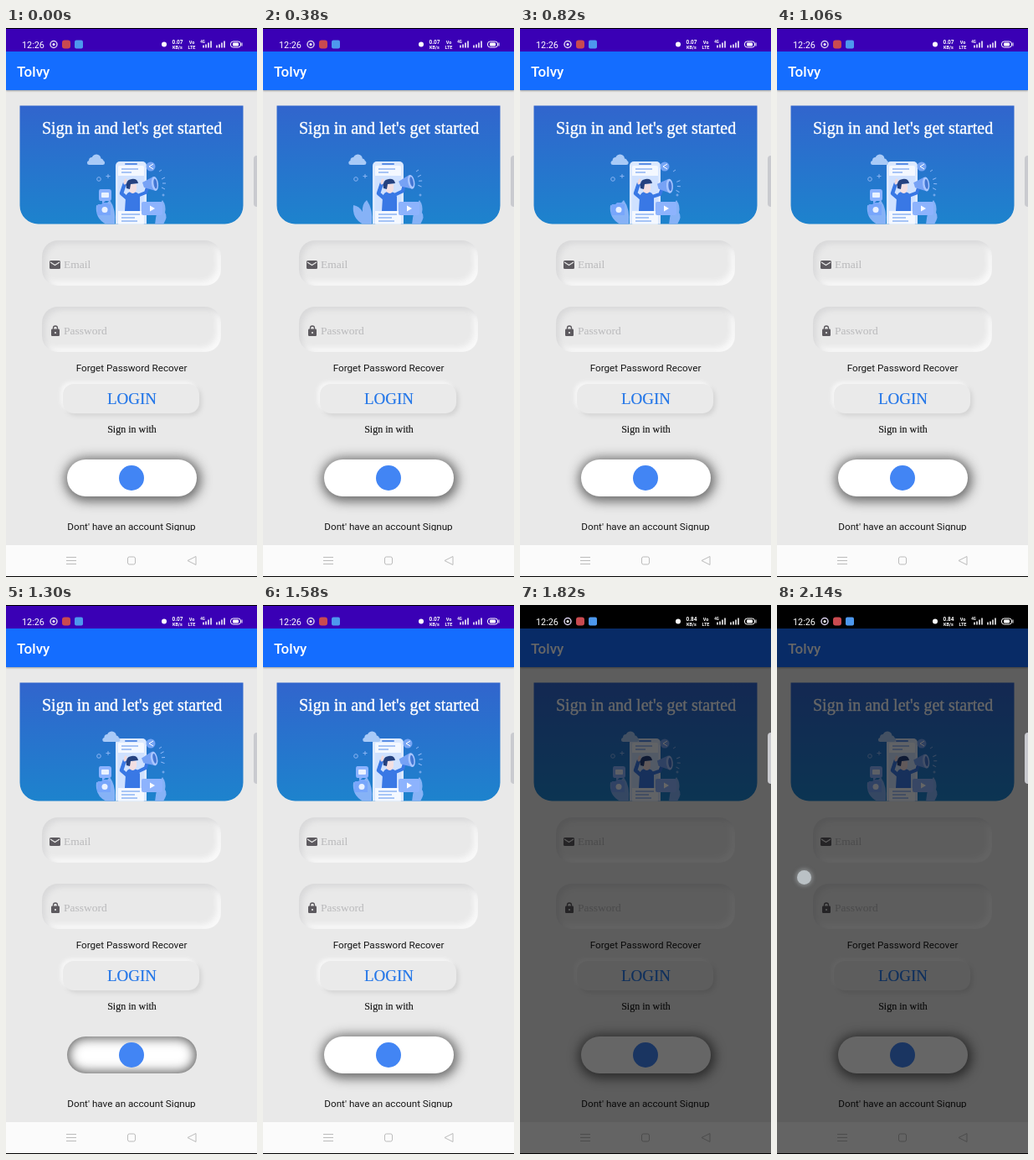
Animation of 300x654 px, one loop 2.18 s. Source, as an HTML page:

```html
<!DOCTYPE html>
<html lang="en">
<head>
<meta charset="utf-8">
<style>
html, body { margin: 0; width: 100%; height: 100%; overflow: hidden; background: #e9e9e9; }
#stage { position: absolute; left: 0; top: 0; width: 300px; height: 654px; overflow: hidden; background: #e9e9e9; }
#stage > * { position: absolute; box-sizing: border-box; }
#stage::after { content: ""; position: absolute; inset: 0; border: solid #000; border-width: 1px 0; }
svg { left: 0; top: 0; }
#bar { left: 0; top: 28px; width: 300px; height: 46px; background: #146dff; box-shadow: 0 1px 2px #0005; }
.field { left: 43px; width: 214px; height: 54px; border-radius: 19px; box-shadow: inset 4px 4px 6px #d9d9da, inset -5px -5px 6px #f9f9f9; }
#login { left: 68px; top: 424px; width: 163px; height: 35px; border-radius: 13px; background: #eaeaea; box-shadow: -3px -3px 4px #f6f6f6, 3px 3px 5px #d4d4d4; }
#social { left: 73px; top: 514px; width: 155px; height: 44px; border-radius: 22px; background: #fff; }
#edge { left: 296px; top: 152px; width: 8px; height: 61px; border-radius: 4px; background: #c9cacf; }
#nav { left: 0; top: 616px; width: 300px; height: 38px; background: #fbfbfb; }
#dim { left: 0; top: 0; width: 300px; height: 654px; background: #000; }
#status { left: 0; top: 0; width: 300px; height: 28px; }
#touch { left: 24px; top: 316px; width: 17px; height: 17px; border-radius: 50%; background: #bac1c5; box-shadow: 0 0 4px 2px #aab0b480; }
text { font-family: Roboto, sans-serif; }
.serif { font-family: "Liberation Serif", serif; }
.pop { transform-box: fill-box; transform-origin: center; }
</style>
</head>
<body>
<div id="stage">
  <div id="bar"></div>
  <div class="field" style="top:253px"></div>
  <div class="field" style="top:332px"></div>
  <div id="login"></div>
  <div id="social"></div>

  <svg width="300" height="654">
    <defs>
      <linearGradient id="sky" x2="0" y2="1">
        <stop stop-color="#3165cd"/><stop offset="1" stop-color="#1d83cd"/>
      </linearGradient>
      <clipPath id="inCard"><rect x="16" y="92" width="268" height="141.500"/></clipPath>
      <clipPath id="cut"><rect y="580" width="300" height="19"/></clipPath>
    </defs>
    <text x="13" y="58" font-size="17" font-weight="500" fill="#fff">Tolvy</text>

    <path d="M16.500 92.500h267v119a22 22 0 0 1-22 22h-223a22 22 0 0 1-22-22z" fill="url(#sky)"/>
    <g clip-path="url(#inCard)">
      <path d="M120 234Q106 227 108 211Q115 212 119 219Q118 210 124 205Q132 216 130 234z" fill="#86b2f6"/>
      <path d="M178 234Q180 214 187 205Q192 212 190 220Q194 224 188 234z" fill="#86b2f6"/>
      <rect x="131" y="159" width="37" height="80" rx="5" fill="#dce9ff"/>
      <rect x="134" y="164" width="31" height="70" rx="2" fill="#f4f8ff"/>
      <rect x="142" y="161" width="15" height="2" rx="1" fill="#5c8fe6"/>
      <path d="M138 168h20M138 172h12" stroke="#8eb4f4" stroke-width="1.5"/>
      <path d="M134 176h31v42h-31z" fill="#cfe1ff"/>
      <g id="cloud" fill="#a9caf7">
        <circle cx="-4" cy="1" r="4"/><circle cx="1" cy="-1" r="5.5"/><circle cx="6" cy="2" r="3.5"/>
        <rect x="-10" y="1" width="21" height="5" rx="2.5"/>
      </g>
      <g fill="none" stroke="#8bb4f3">
        <circle cx="111" cy="180" r="2.3"/><circle cx="188" cy="199" r="1"/>
        <path d="M122 174v5M119.500 176.500h5M183 171l3-2"/>
      </g>
      <g id="share" class="pop">
        <circle cx="173" cy="165" r="5.5" fill="#75a4f4"/>
        <path d="M176 162l-5 3 5 3" fill="none" stroke="#fff"/>
      </g>
      <g id="chat" class="pop">
        <path d="M113 192h10q3 0 3 3v8q0 3-3 3h-4l-4 3v-3h-2q-2 0-2-3v-8q0-3 2-3z" fill="#8bb2ff"/>
        <rect x="114" y="196" width="9" height="6" rx="1" fill="#eaf2ff"/>
      </g>
      <g id="camera" class="pop">
        <path d="M110 210h4l2-2h5l2 2h2v13h-16v-11z" fill="#78a6fb"/>
        <circle cx="118" cy="216.500" r="3.500" fill="#e9f1ff"/>
      </g>
      <path d="M142 218L143 202Q144 195 150 195Q158 194 160 201L160 218z" fill="#3978e5"/>
      <path d="M145 203L138 197L142 185" fill="none" stroke="#3978e5" stroke-width="4.500" stroke-linejoin="round"/>
      <path d="M142 185l1-4" stroke="#f2d9da" stroke-width="3" stroke-linecap="round"/>
      <path d="M134 218h31v16h-31z" fill="#f4f8ff"/>
      <path d="M138 222h22M138 226h16M138 230h19" stroke="#8fb5f4" stroke-width="1.5"/>
      <g id="horn">
        <path d="M157 200L167 196L169 190" fill="none" stroke="#3978e5" stroke-width="4" stroke-linejoin="round"/>
        <path d="M163 184L176 177L179 194L165 190z" fill="#77a2f5"/>
        <ellipse cx="178" cy="185.500" rx="4" ry="8.5" transform="rotate(-8 178 185.500)" fill="#a9c6ff"/>
        <ellipse cx="178.500" cy="185.500" rx="2" ry="6" transform="rotate(-8 178 185.500)" fill="#4477d4"/>
        <path d="M186 180l4-2M187 185h4M186 190l4 2" stroke="#94bbf8"/>
      </g>
      <path d="M147 186h9v6q-1 5-5 5q-4-1-4-5z" fill="#f3dfe2"/>
      <path d="M144 191Q142 181 150 180Q157 179 158 185L149 186L148 192z" fill="#25417f"/>
      <g id="play" class="pop">
        <rect x="162" y="207" width="25" height="16" rx="2" fill="#8db3fd"/>
        <path d="M172 211.500l6 3.500-6 3.500z" fill="#fff"/>
      </g>
    </g>

    <text class="serif" x="43" y="126" font-size="20" fill="#fff" stroke="#fff" stroke-width=".4">Sign in and let's get started</text>
    <text class="serif" x="69" y="286" font-size="13.500" fill="#b9b9bb">Email</text>
    <text class="serif" x="69" y="365" font-size="13.500" fill="#b9b9bb">Password</text>
    <text class="serif" x="150.500" y="448" font-size="19" fill="#2376e8" stroke="#2376e8" stroke-width=".2" text-anchor="middle">LOGIN</text>
    <text class="serif" x="150.500" y="482" font-size="12" fill="#151515" stroke="#151515" stroke-width=".15" text-anchor="middle">Sign in with</text>
    <text x="150" y="409" font-size="11.700" fill="#161616" text-anchor="middle">Forget Password Recover</text>
    <text x="150" y="598" font-size="11.700" fill="#161616" text-anchor="middle" clip-path="url(#cut)">Dont' have an account Signup</text>

    <rect x="52" y="277" width="13" height="10" rx="1.500" fill="#5d5a5f"/>
    <path d="M53 279l5.500 3.500 5.500-3.500" fill="none" stroke="#e9e9e9" stroke-width="1.200"/>
    <rect x="54" y="358.500" width="10" height="8.500" rx="1.200" fill="#5d5a5f"/>
    <path d="M56.500 359v-1.500a2.500 2.500 0 0 1 5 0v1.500" fill="none" stroke="#5d5a5f" stroke-width="1.300"/>
    <circle cx="59" cy="363" r="1.100" fill="#e9e9e9"/>
    <circle cx="150" cy="536" r="15" fill="#4285f4"/>
  </svg>

  <div id="nav"></div>
  <svg width="300" height="654" fill="none" stroke="#bbb">
    <path d="M72 630.500h12M72 634.500h12M72 638.500h12M227 629.500v10l-10-5z"/>
    <rect x="145.500" y="630" width="9" height="9" rx="2"/>
  </svg>
  <div id="dim"></div>
  <div id="edge"></div>
  <div id="status"></div>
  <svg width="300" height="28" fill="#fff">
    <text x="19" y="23.500" font-size="10.800">12:26</text>
    <circle cx="57" cy="19.500" r="4" fill="none" stroke="#d8d0ec" stroke-width="1.500"/>
    <circle cx="57" cy="19.500" r="1.500"/>
    <rect x="67" y="14.500" width="10" height="10" rx="3" fill="#c94a50"/>
    <rect x="82" y="14.500" width="10" height="10" rx="2" fill="#4d98ee"/>
    <circle cx="189" cy="19.500" r="3"/>
    <g font-weight="700" text-anchor="middle">
      <text id="rate" x="205" y="18.500" font-size="6.500">0.07</text>
      <text x="205" y="24.500" font-size="5.500">KB/s</text>
      <text x="222" y="18.500" font-size="5.500">Vo</text>
      <text x="222" y="24.500" font-size="5.500">LTE</text>
      <text x="235" y="18" font-size="4.500">4G</text>
    </g>
    <path d="M236 23.500v-3M239 23.500v-4M242 23.500v-6M245 23.500v-8M252 23.500v-3M255 23.500v-4M258 23.500v-6M261 23.500v-8" stroke="#fff" stroke-width="1.500"/>
    <rect x="268.500" y="16" width="12" height="7" rx="3" fill="none" stroke="#fff"/>
    <rect x="271" y="17.500" width="7" height="4" rx="1"/>
    <path d="M282 17.500v4" stroke="#fff"/>
  </svg>
  <div id="touch"></div>
</div>
<script>
const $ = id => document.getElementById(id);
const ramp = (t, a, b) => Math.min(1, Math.max(0, (t - a) / (b - a)));
const LOOP = 2180;
// Each badge shrinks away, then pops back in.
const badges = { chat: [160, 920], camera: [130, 540], share: [180, 640], play: [140, 260] };

function draw(now) {
  const time = now % LOOP;
  const t = time < 100 ? 0 : 100 + Math.floor((time - 100) / 40) * 40;

  for (const id in badges) {
    const [out, back] = badges[id];
    const size = 1 - ramp(t, out, out + 80) + ramp(t, back, back + 120);
    $(id).style.transform = `scale(${size})`;
  }
  $("cloud").setAttribute("transform", `translate(${107 + 24 * ramp(t, 0, 1700)} 157)`);
  const swing = Math.sin(t / LOOP * Math.PI * 4);
  $("horn").setAttribute("transform", `translate(0 ${-1.5 * swing}) rotate(${-4 * swing} 160 199)`);

  const press = ramp(t, 1200, 1280) - ramp(t, 1400, 1520);
  $("social").style.boxShadow =
    `1px 2px 13px 4px rgba(85,85,85,${0.85 * (1 - press)}), inset 0 0 13px 2px rgba(70,70,70,${0.9 * press})`;

  const dim = 0.6 * ramp(t, 1660, 1820);
  $("dim").style.opacity = dim;
  $("status").style.background = dim > 0.1 ? "#000" : "#3a00b5";
  $("rate").textContent = t < 1820 ? "0.07" : "0.84";
  $("touch").style.opacity = ramp(t, 2020, 2100);
  requestAnimationFrame(draw);
}
draw(0);
</script>
</body>
</html>
```
